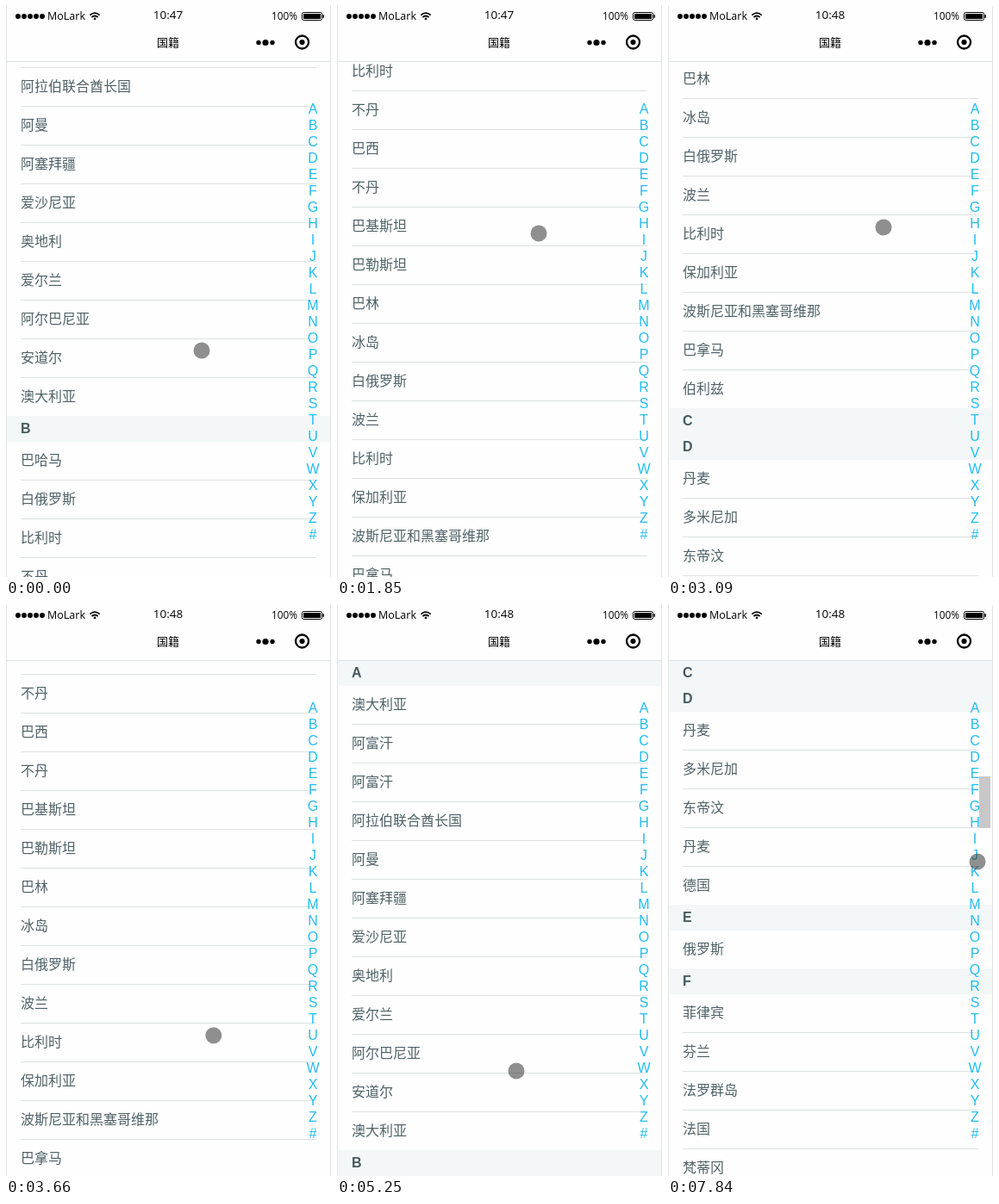
An HTML page for the animation above (7990 ms loop, 377 by 663 pixels).

```html
<!DOCTYPE html>
<html lang="zh-CN">
<head>
<meta charset="utf-8">
<style>
html, body { margin: 0; width: 100%; height: 100%; overflow: hidden; background: #fefefe; }
#stage { position: relative; width: 377px; height: 663px; overflow: hidden; background: #fefefe;
  font: 16px "Noto Sans CJK SC", "Noto Sans CJK", sans-serif; color: #475a60; }
#stage > * { position: absolute; }
#view { left: 0; top: 64px; width: 377px; height: 599px; overflow: hidden; }
h2 { margin: 0; height: 30px; padding-left: 17px; background: #f3f7f8;
  font: bold 16px/29px "Liberation Sans", Arial, sans-serif; }
.item { height: 44px; margin: 0 17px; line-height: 41px; white-space: nowrap; color: #4e6268; }
.item + .item { border-top: 1px solid #dce1e1; }
#letters { left: 346px; top: 110px; width: 20px; text-align: center; color: #22bdf3;
  font: 16px/19px "Liberation Sans", Arial, sans-serif; }
#bar { left: 361px; top: 199px; width: 13px; height: 60px; background: rgba(0, 0, 0, .21); }
#top { left: 0; top: 0; }
#edge { inset: 0; border: solid #dfe3e4; border-width: 0 1px; }
#cursor { left: -9.5px; top: -9.5px; width: 19px; height: 19px; border-radius: 50%; background: rgba(51, 51, 51, .55); }
</style>
</head>
<body>
<div id="stage">
  <div id="view"><div id="list"></div></div>
  <div id="edge"></div>
  <div id="letters"></div>
  <div id="bar"></div>
  <svg id="top" width="377" height="65" font-family="'Open Sans', 'Noto Sans', sans-serif">
    <path d="M1 0H376V64H1z" fill="#fefefe"/>
    <path d="M0 64.5H377" stroke="#dce3e3"/>
    <path d="M14 12h29" stroke="#000" stroke-width="6" stroke-linecap="round" stroke-dasharray="0 7"/>
    <text x="48" y="15.5" font-size="12.5">MoLark</text>
    <g fill="none" stroke="#000" stroke-width="1.7">
      <path d="M97.3 10.6q5.7-4.8 11.4 0M99.4 13q3.6-3 7.2 0"/>
      <path d="M103 14.8v.1" stroke-width="2.6" stroke-linecap="round"/>
    </g>
    <text id="clock" x="188" y="15" font-size="13.5" text-anchor="middle"></text>
    <text x="308" y="16" font-size="11.8">100%</text>
    <rect x="343.5" y="7.5" width="23" height="9" rx="2" fill="none" stroke="#000"/>
    <path d="M345 9h20v6h-20zM367.5 10.2h1.5v3.6h-1.5z"/>
    <text x="188" y="47" font-size="13" text-anchor="middle" font-family="'Noto Sans CJK SC', 'Noto Sans CJK', sans-serif">国籍</text>
    <circle cx="293" cy="42.5" r="2.7"/><circle cx="301" cy="42.5" r="3.6"/><circle cx="309" cy="42.5" r="2.7"/>
    <circle cx="343.5" cy="42" r="7.5" fill="none" stroke="#000" stroke-width="2.3"/><circle cx="343.5" cy="42" r="3.1"/>
  </svg>
  <div id="cursor"></div>
</div>
<script>
const LOOP = 7990, JUMP = 6890, STEP = 130;
const $ = id => document.getElementById(id);

const sections = {
  A: '澳大利亚 阿富汗 阿富汗 阿拉伯联合酋长国 阿曼 阿塞拜疆 爱沙尼亚 奥地利 爱尔兰 阿尔巴尼亚 安道尔 澳大利亚',
  B: '巴哈马 白俄罗斯 比利时 不丹 巴西 不丹 巴基斯坦 巴勒斯坦 巴林 冰岛 白俄罗斯 波兰 比利时 保加利亚 波斯尼亚和黑塞哥维那 巴拿马 伯利兹',
  C: '',
  D: '丹麦 多米尼加 东帝汶 丹麦 德国',
  E: '俄罗斯',
  F: '菲律宾 芬兰 法罗群岛 法国 梵蒂冈'
};
$('list').innerHTML = Object.entries(sections).map(([key, names]) =>
  `<h2>${key}</h2>` + names.split(' ').filter(Boolean).map(n => `<div class="item">${n}</div>`).join('')).join('');
$('letters').innerHTML = [...'ABCDEFGHIJKLMNOPQRSTUVWXYZ#'].map(c => `<div>${c}</div>`).join('');
const headingC = $('list').querySelectorAll('h2')[2].offsetTop - $('list').offsetTop;

// Ends of each drag and each return of the finger
const poses = [
  { t: 150, x: 226.5, y: 399.5, offset: 157 },
  { t: 670, x: 233, y: 225, offset: 331 },
  { t: 1210, x: 231.5, y: 528.5, offset: 375 },
  { t: 1850, x: 233.5, y: 263.5, offset: 699 },
  { t: 2480, x: 250, y: 416, offset: 800 },
  { t: 3090, x: 249.5, y: 256.5, offset: 960 },
  { t: 3800, x: 238, y: 560, offset: 656 },
  { t: 4180, x: 230, y: 250, offset: 443 },
  { t: 4440, x: 228.5, y: 339.5, offset: 354 },
  { t: 5250, x: 207.5, y: 540.5, offset: 0 },
  { t: 5520, x: 205, y: 280, offset: 0 },
  { t: 6330, x: 356, y: 157, offset: 0 },
  { t: 7320, x: 356, y: 157, offset: 0 },
  { t: 7710, x: 341, y: 333, offset: 0 },
  { t: 7840, x: 358.5, y: 297.5, offset: 0 }
];

// The screen refreshes in steps, so each move is split into equal jumps
function poseAt(time) {
  const i = poses.findLastIndex(p => p.t <= time);
  const a = poses[Math.max(i, 0)], b = poses[i + 1];
  if (i < 0 || !b) return a;
  const span = b.t - a.t, steps = Math.round(span / STEP);
  const p = Math.floor((time - a.t) / span * steps) / steps;
  const mix = key => a[key] + (b[key] - a[key]) * p;
  return { x: mix('x'), y: mix('y'), offset: mix('offset') };
}

function draw(time) {
  const { x, y, offset } = poseAt(time);
  const jumped = time >= JUMP;
  $('list').style.transform = `translateY(${-Math.round(jumped ? headingC : offset)}px)`;
  $('cursor').style.transform = `translate(${x}px, ${y}px)`;
  $('bar').style.display = jumped ? 'block' : 'none';
  $('clock').textContent = time < 2780 ? '10:47' : '10:48';
}

const start = performance.now();
function frame() {
  draw((performance.now() - start) % LOOP);
  requestAnimationFrame(frame);
}
frame();
</script>
</body>
</html>
```
